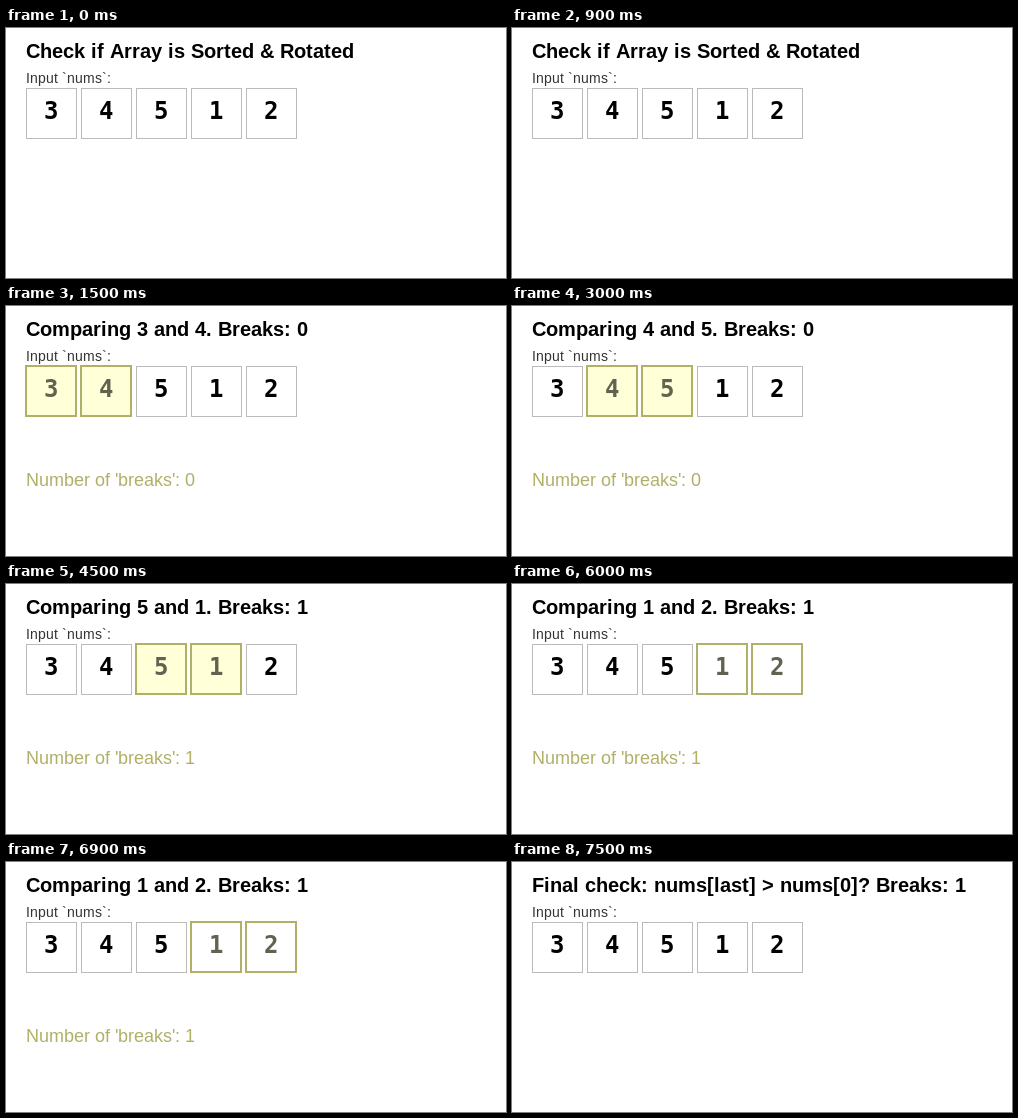
Recreate the animation shown at these times as an HTML page with a canvas. Size 500 by 250 pixels, loop 8000 ms.

```html
<!DOCTYPE html>
<html lang="en">
<head>
<meta charset="utf-8">
<style>
html, body { margin: 0; width: 100%; height: 100%; overflow: hidden; background: #fff; }
canvas { display: block; }
</style>
</head>
<body>
<canvas id="stage" width="500" height="250"></canvas>
<script>
const ctx = document.getElementById('stage').getContext('2d');
const SANS = '"Liberation Sans", Arial, sans-serif';
const MONO = '"DejaVu Sans Mono", monospace';
const OLIVE = '#b0b068';
const STEP = 1500, LOOP = 8000;
const nums = [3, 4, 5, 1, 2];

// Set text on whole-pixel advances, as hinted fonts do.
function text(value, x, y, font, color) {
  ctx.font = font;
  ctx.fillStyle = color;
  for (const char of String(value)) {
    ctx.fillText(char, x, y);
    x += Math.round(ctx.measureText(char).width);
  }
}

function drawCell(index, active, fill) {
  const x = 20 + index * 55, y = 60;
  ctx.fillStyle = active ? fill : '#fff';
  ctx.fillRect(x, y, 50, 50);
  ctx.strokeStyle = active ? OLIVE : '#bbb';
  ctx.lineWidth = active ? 2 : 1;
  const offset = active ? 0 : 0.5;
  ctx.strokeRect(x + offset, y + offset, 50, 50);
  text(nums[index], x + 18, 91, `bold 24px ${MONO}`, active ? '#626250' : '#000');
}

function countBreaks(pairs) {
  return nums.slice(0, pairs).filter((n, i) => n > nums[i + 1]).length;
}

function draw(step) {
  const left = step - 1;
  const comparing = step >= 1 && step <= 4;
  const breaks = countBreaks(step);
  let title = 'Check if Array is Sorted & Rotated';
  if (comparing) title = `Comparing ${nums[left]} and ${nums[step]}. Breaks: ${breaks}`;
  if (step === 5) title = `Final check: nums[last] > nums[0]? Breaks: ${breaks}`;

  ctx.fillStyle = '#fff';
  ctx.fillRect(0, 0, 500, 250);
  text(title, 20, 30, `bold 20px ${SANS}`, '#000');
  text('Input `nums`:', 20, 55, `14px ${SANS}`, '#333');

  const fill = step === 4 ? '#fff' : '#ffffd8';
  nums.forEach((_, i) => drawCell(i, comparing && (i === left || i === step), fill));
  if (comparing) text(`Number of 'breaks': ${breaks}`, 20, 180, `18px ${SANS}`, OLIVE);
}

function tick() {
  draw(Math.floor(performance.now() % LOOP / STEP));
  requestAnimationFrame(tick);
}
tick();
</script>
</body>
</html>
```
